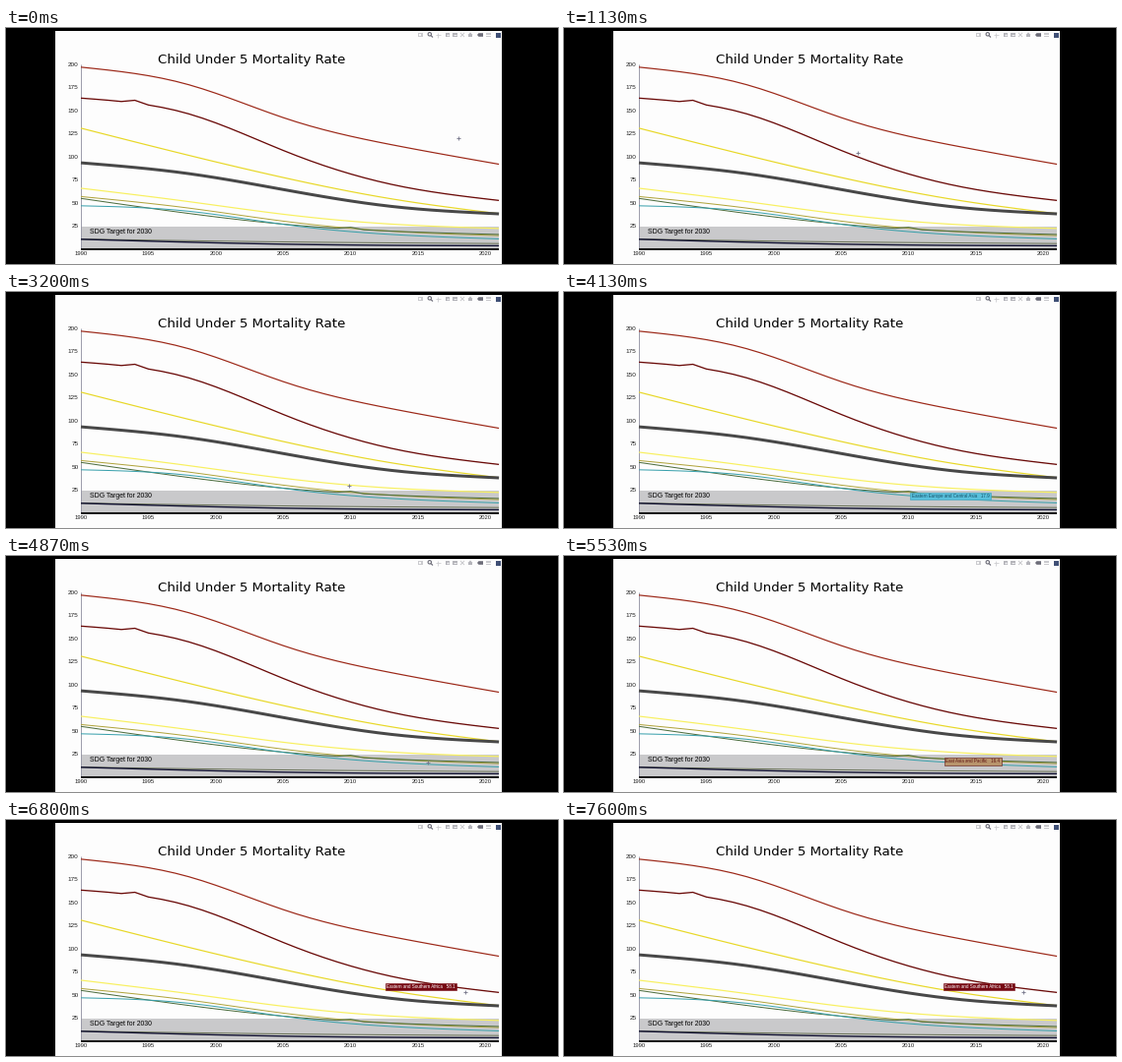
A matplotlib script for the animation above (7670 ms loop, 560 by 240 pixels).

```python
import numpy as np
import matplotlib.pyplot as plt
from matplotlib.animation import FuncAnimation
from matplotlib.patches import Circle, Rectangle

W, H, DPI = 560, 240, 100
PT = 72 / DPI  # points per pixel
STEP, COUNT = 65, 118
MOVE = 800  # ms the pointer travels before each stop
YEARS = np.arange(1990, 2022)

plt.rcParams["toolbar"] = "None"
fig = plt.figure(figsize=(W / DPI, H / DPI), dpi=DPI, facecolor="black")
ax = fig.add_axes([0, 0, 1, 1])
ax.set_xlim(0, W)
ax.set_ylim(H, 0)
ax.axis("off")


def px(year):
    return 76 + (year - 1990) * 13.68


def py(value):
    return 225 - 0.94 * value


def rect(x0, y0, x1, y1, color, z=1):
    ax.add_patch(Rectangle((x0, y0), x1 - x0, y1 - y0, fc=color, ec="none", zorder=z))


def line(xs, ys, color, width, z=3):
    return ax.plot(xs, ys, color=color, lw=width * PT, zorder=z,
                   solid_capstyle="butt", solid_joinstyle="round")[0]


def text(x, y, s, size, font="Liberation Sans", color="#202020", **kw):
    return ax.text(x, y, s, fontsize=size * PT, family=font, color=color,
                   va="baseline", **kw)


def spline(keys):
    """Yearly values of a natural cubic spline through evenly spaced keys."""
    y = np.array(keys, float)
    n = len(y)
    inner = 4 * np.eye(n - 2) + np.eye(n - 2, k=1) + np.eye(n - 2, k=-1)
    m = np.zeros(n)
    m[1:-1] = np.linalg.solve(inner, 6 * np.diff(y, 2))
    s = np.linspace(0, n - 1, len(YEARS))
    k = np.minimum(s.astype(int), n - 2)
    b = s - k
    a = 1 - b
    return a * y[k] + b * y[k + 1] + ((a**3 - a) * m[k] + (b**3 - b) * m[k + 1]) / 6


# colour, line width, values evenly spaced from 1990 to 2021
SERIES = [
    ("#9c2818", 1.2, [197, 179, 140, 112.5, 92]),
    ("#6a0a08", 1.3, [163.5, 147.5, 104, 69.5, 52.8]),
    ("#e8d828", 1.2, [131, 102.5, 76, 54, 38.5]),
    ("#f8f060", 1.2, [66, 52, 37, 27, 22.5]),
    ("#b0a43c", 1.0, [57, 45, 29.5, 19.3, 14.8]),
    ("#4c6c3c", 1.0, [55, 39.2, 26.5, 19.5, 16]),
    ("#38a0ac", 1.0, [47, 41.5, 26, 15.8, 11.2]),
    ("#6c7458", 1.0, [11, 7.9, 6.2]),
    ("#101030", 1.4, [10.8, 5.4, 3.8]),
    ("#484848", 3.0, [93.5, 82.3, 63.3, 46, 38.3]),
]
SPIKES = {1: (1994, 3), 5: (2010, 2)}  # one-year rises


def draw_toolbar():
    pale, mid, dark = "#cacace", "#b4b4ba", "#6c6c78"
    rect(417.5, 5, 422.5, 9, pale)
    ax.add_patch(Circle((420, 7), 1.1, fc="white", ec="none", zorder=2))
    ax.add_patch(Circle((429.8, 6.3), 1.7, fc="none", ec=dark, lw=0.8, zorder=2))
    line([431, 433], [7.5, 9.5], dark, 1.2)
    line([435.5, 440.5], [7, 7], pale, 0.8)
    line([438, 438], [4.5, 9.5], pale, 0.8)
    for x in (448, 455.5):
        rect(x - 2.4, 4.6, x + 2.4, 9.4, mid)
        line([x - 1.4, x + 1.4], [7, 7], "white", 0.8)
    line([448, 448], [5.6, 8.4], "white", 0.8)
    line([461, 465], [9, 5], pale, 1)
    line([461, 465], [5, 9], pale, 1)
    ax.fill([468.5, 471, 473.5], [7, 4.5, 7], color=mid, lw=0)
    rect(469.3, 7, 472.7, 9.3, mid)
    ax.fill([478, 479.5, 484, 484, 479.5], [7, 5.2, 5.2, 8.8, 8.8], color=dark, lw=0)
    for y in (4.8, 7.5):
        rect(486.5, y, 491.5, y + 1.7, pale)
    rect(496.5, 4.5, 501.5, 9.5, "#3f4f75")


def draw_chart():
    rect(50, 3, 503, H, "#fdfdfd", 0)
    rect(76, py(25), 500, 225, "#c9c9cb")
    line([75.5, 75.5], [37, 225], "#9494a4", 0.9, 2)
    line([75.5, 500], [224.7, 224.7], "black", 1.8, 2)
    text(249.5, 36, "Child Under 5 Mortality Rate", 13.35, "DejaVu Sans",
         "black", ha="center")
    text(85, 208.6, "SDG Target for 2030", 6.9, color="black", zorder=4)
    for v in range(25, 201, 25):
        text(73.7, py(v) + 1.7, str(v), 6.4, ha="right")
    for year in range(1990, 2021, 5):
        text(px(year), 231.2, str(year), 5.9, ha="center")
    for i, (color, width, keys) in enumerate(SERIES):
        year, rise = SPIKES.get(i, (1990, 0))
        line(px(YEARS), py(spline(keys) + rise * (YEARS == year)), color, width)
    draw_toolbar()


AFRICA = "Eastern and Southern Africa"
# start ms, end ms, region, year, value, side, fill, ink, edge
HOVERS = [
    (1190, 2500, AFRICA, 2006, 101.1, "left", "#760812", "white", "#760812"),
    (3400, 4500, "Eastern Europe and Central Asia", 2010, 17.9, "left",
     "#58c0dc", "#185068", "#38a0bc"),
    (5000, 5980, "East Asia and Pacific", 2017, 16.4, "right",
     "#b8946c", "#5c1010", "#5c1010"),
    (6300, 7670, AFRICA, 2018, 58.1, "right", "#760812", "white", "#760812"),
]


def make_label(region, year, value, side, fill, ink, edge):
    shift = 3 if side == "left" else -3
    return text(px(year) + shift, py(value) + 0.8, f"{region}   {value}", 4.5,
                color=ink, ha=side, zorder=8, visible=False,
                bbox=dict(boxstyle="square,pad=0.28", fc=fill, ec=edge, lw=0.4))


# arrival ms, x, y of the pointer
STOPS = [(0, 459, 112), (1080, 298, 127), (2250, 310, 148),
         (3400, 356, 208), (5000, 440, 210), (6350, 466, 175)]


def pointer(t):
    pos = np.array(STOPS[0][1:], float)
    for (_, *here), (arrive, *there) in zip(STOPS, STOPS[1:]):
        u = np.clip((t - arrive) / MOVE + 1, 0, 1)
        pos += u * u * (3 - 2 * u) * np.subtract(there, here)
    return pos


draw_chart()
labels = [make_label(*h[2:]) for h in HOVERS]
cross = [line([], [], "#78788c", 0.9, 7) for _ in range(2)]


def update(i):
    t = i * STEP
    x, y = pointer(t)
    cross[0].set_data([x - 2, x + 2], [y, y])
    cross[1].set_data([x, x], [y - 2, y + 2])
    for label, (start, end, *_) in zip(labels, HOVERS):
        label.set_visible(start <= t < end)
    return [*cross, *labels]


anim = FuncAnimation(fig, update, frames=COUNT, interval=STEP,
                     repeat=True, repeat_delay=0, blit=False)
plt.show()
```
